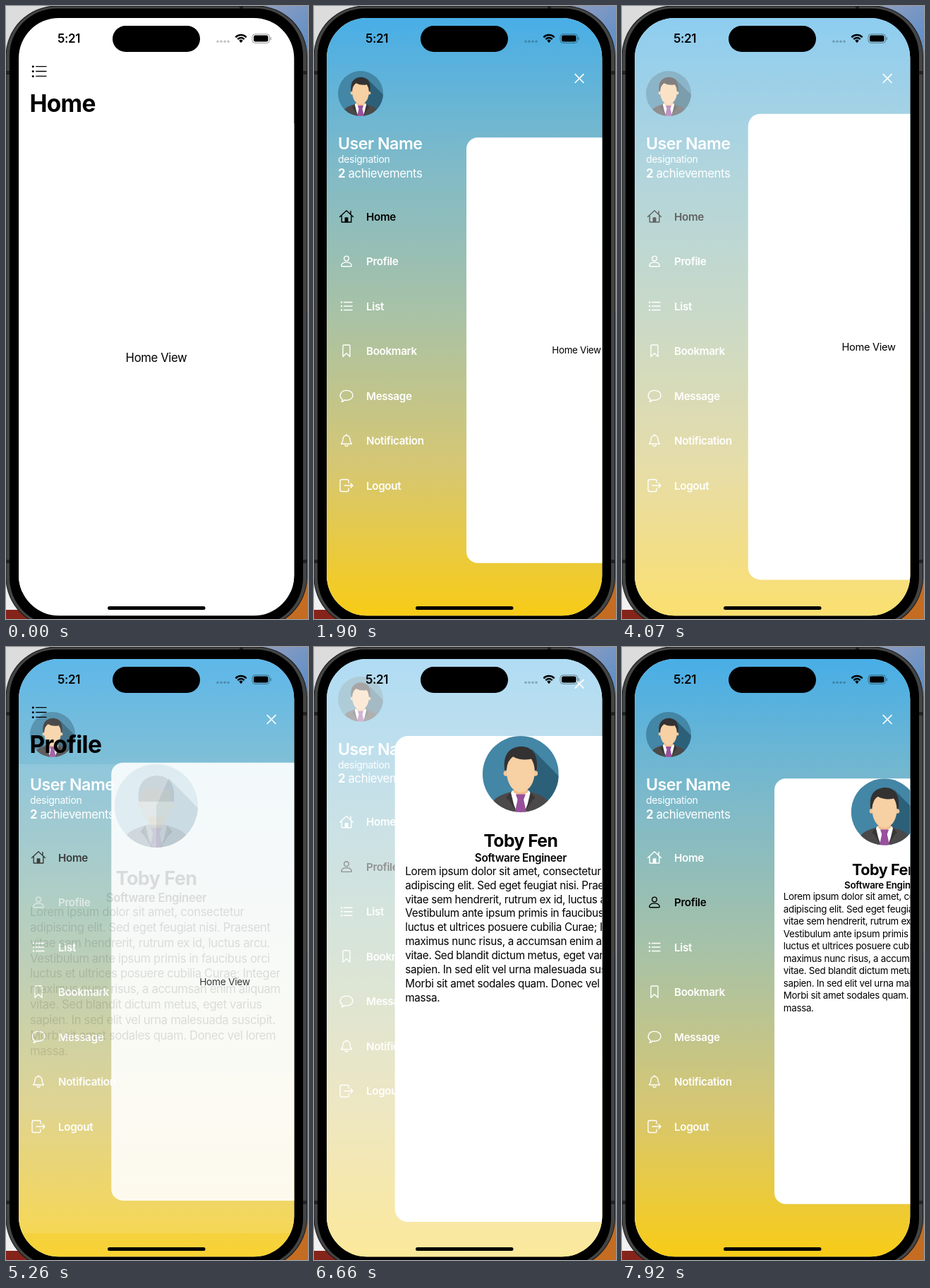
An HTML page with a canvas for the animation above (8 s loop, 428x868 px).

```html
<!DOCTYPE html>
<html lang="en">
<head>
<meta charset="utf-8">
<title>Side menu</title>
<style>
  html, body { margin: 0; width: 100%; height: 100%; overflow: hidden; background: #fff; }
  canvas { display: block; width: 428px; height: 868px; }
</style>
</head>
<body>
<canvas id="stage"></canvas>
<script>
const W = 428, H = 868, LOOP = 8000, STEP = 70;
const canvas = document.getElementById('stage');
const ctx = canvas.getContext('2d');
const dpr = window.devicePixelRatio || 1;
canvas.width = W * dpr;
canvas.height = H * dpr;

// Each move: first visible time, time already elapsed then, spring rate, opening?
const MOVES = [
  { at: 710, lag: 45, rate: 17, open: true },
  { at: 2670, lag: 20, rate: 14, open: false },
  { at: 3930, lag: 63, rate: 17, open: true },
  { at: 5190, lag: 5, rate: 18, open: false, swap: true },
  { at: 6520, lag: 19, rate: 10.6, open: true, slide: true }
];
const SWAP_AT = 5190, PRESS_AT = 5050;

// Card layout with and without the navigation bar
const FULL = { cy: 452.5, h: 753 };
const UNDER_NAV = { cy: 498, h: 664 };
const BODY = 16.7;

// Evenly spaced stops of a perceptual blend from blue to yellow
const SKY = ['#48aee6', '#80bac8', '#a9c2a5', '#d6c773', '#f8cc17'];

const ICONS = {
  Home: 'M-9.5 .5L0-8.2L9.5 .5M-6.8-1.8V8H6.8V-1.8M6-3V-7.5',
  Profile: 'M-3.4-4a3.4 3.4 0 1 0 6.8 0a3.4 3.4 0 1 0-6.8 0M-6 7.2H6Q7.4 7.2 7.2 5.6C6.5 2.8 3.5 1.4 0 1.4S-6.5 2.8-7.2 5.6Q-7.4 7.2-6 7.2Z',
  List: 'M-3.5-5.5H8M-3.5 0H8M-3.5 5.5H8',
  Bookmark: 'M-5 8V-7Q-5-8.5-3.5-8.5H3.5Q5-8.5 5-7V8L0 3.2Z',
  Message: 'M-5.5 5.2C-11 1.5-9.5-7.6 0-7.6C12-7.6 12 6.2 0 6.2Q-2 6.2-3 6Q-4.5 8.2-7 8.2Q-5.3 7-5.5 5.2Z',
  Notification: 'M-7.5 4.5Q-5 1.5-5-2A5 5.5 0 0 1 5-2Q5 1.5 7.5 4.5ZM-2.2 6.5Q0 9.5 2.2 6.5M0-7.5V-8.8',
  Logout: 'M3-4V-6.5Q3-8.5 1-8.5H-6.5Q-9-8.5-9-6V6Q-9 8.5-6.5 8.5H1Q3 8.5 3 6.5V4M-3 0H9M6-3L9 0L6 3'
};
const ITEMS = Object.keys(ICONS);
const PATHS = Object.fromEntries(ITEMS.map(k => [k, new Path2D(ICONS[k])]));

const BIO = [
  'Lorem ipsum dolor sit amet, consectetur',
  'adipiscing elit. Sed eget feugiat nisi. Praesent',
  'vitae sem hendrerit, rutrum ex id, luctus arcu.',
  'Vestibulum ante ipsum primis in faucibus orci',
  'luctus et ultrices posuere cubilia Curae; Integer',
  'maximus nunc risus, a accumsan enim aliquam',
  'vitae. Sed blandit dictum metus, eget varius',
  'sapien. In sed elit vel urna malesuada suscipit.',
  'Morbi sit amet sodales quam. Donec vel lorem',
  'massa.'
];

const clamp = x => Math.max(0, Math.min(1, x));
const smooth = x => { x = clamp(x); return x * x * (3 - 2 * x); };
const spring = u => 1 - (1 + u) * Math.exp(-u);

function box(x, y, w, h, r, fill) {
  ctx.beginPath();
  ctx.roundRect(x, y, w, h, r);
  if (fill) { ctx.fillStyle = fill; ctx.fill(); }
}

function disc(x, y, r, fill) {
  ctx.beginPath();
  ctx.arc(x, y, r, 0, Math.PI * 2);
  ctx.fillStyle = fill;
  ctx.fill();
}

function poly(fill, ...p) {
  ctx.beginPath();
  for (let i = 0; i < p.length; i += 2) ctx.lineTo(p[i], p[i + 1]);
  ctx.fillStyle = fill;
  ctx.fill();
}

// y is the middle of the capital letters
function text(str, x, y, size, weight, color = '#000', align = 'left') {
  ctx.font = `${weight} ${size}px Inter, "Liberation Sans", sans-serif`;
  ctx.letterSpacing = `${-0.022 * size}px`;
  ctx.textAlign = align;
  ctx.fillStyle = color;
  ctx.fillText(str, x, y + size * 0.364);
}

function at(x, y, scale, draw) {
  ctx.save();
  ctx.translate(x, y);
  ctx.scale(scale, scale);
  draw();
  ctx.restore();
}

function avatar(x, y, r) {
  at(x, y, r, () => {
    ctx.beginPath();
    ctx.arc(0, 0, 1, 0, Math.PI * 2);
    ctx.clip();
    ctx.fillStyle = '#4386a6';
    ctx.fillRect(-1, -1, 2, 2);
    poly('#2c6079', .3, -.66, 1, .05, 1, 1, 0, 1, 0, 0);
    // suit, shirt and tie
    ctx.beginPath();
    ctx.moveTo(-.74, 1);
    ctx.lineTo(-.72, .72);
    ctx.quadraticCurveTo(-.65, .57, -.2, .45);
    ctx.lineTo(.2, .45);
    ctx.quadraticCurveTo(.65, .57, .72, .72);
    ctx.lineTo(.74, 1);
    ctx.fillStyle = '#4b4949';
    ctx.fill();
    poly('#fff', -.22, .43, .22, .43, .32, .6, .1, 1, -.1, 1, -.32, .6);
    poly('#383636', -.26, .47, -.38, .62, -.3, .7, -.1, 1, -.18, .8);
    poly('#383636', .26, .47, .38, .62, .3, .7, .1, 1, .18, .8);
    poly('#efbd8c', -.17, .25, .17, .25, .19, .48, 0, .58, -.19, .48);
    poly('#98509d', -.13, .53, .13, .53, .08, .67, .15, 1, -.15, 1, -.08, .67);
    // head
    disc(-.38, -.02, .07, '#f3c797');
    disc(.38, -.02, .07, '#f3c797');
    ctx.beginPath();
    ctx.moveTo(-.42, -.1);
    ctx.bezierCurveTo(-.47, -.5, -.32, -.7, 0, -.73);
    ctx.bezierCurveTo(.36, -.73, .46, -.45, .42, -.1);
    ctx.fillStyle = '#333132';
    ctx.fill();
    ctx.beginPath();
    ctx.moveTo(-.37, -.12);
    ctx.quadraticCurveTo(-.35, -.36, -.2, -.46);
    ctx.quadraticCurveTo(.02, -.34, .28, -.4);
    ctx.quadraticCurveTo(.36, -.28, .37, -.1);
    ctx.bezierCurveTo(.38, .25, .2, .47, 0, .48);
    ctx.bezierCurveTo(-.2, .47, -.38, .25, -.37, -.12);
    ctx.fillStyle = '#f7d0a4';
    ctx.fill();
  });
}

function icon(name, x, y, color, scale = 1) {
  at(x, y, scale, () => {
    ctx.strokeStyle = color;
    ctx.lineWidth = 1.4 / scale;
    ctx.lineCap = ctx.lineJoin = 'round';
    ctx.stroke(PATHS[name]);
    if (name === 'List') for (const dy of [-5.5, 0, 5.5]) disc(-7, dy, 1.2, color);
    if (name === 'Home') box(-2.4, 1.2, 4.8, 7, .5, color);
  });
}

function menu(fade, shift, picked, pressed) {
  const g = ctx.createLinearGradient(0, 17, 0, 863);
  SKY.forEach((c, i) => g.addColorStop(i / (SKY.length - 1), c));
  ctx.fillStyle = g;
  ctx.fillRect(18, 17, 391, 847);

  at(0, shift, 1, () => {
    avatar(66, 124, 32);
    text('User Name', 34, 195, 23.2, 600, '#fff');
    text('designation', 34, 217, 14, 400, '#fff');
    text('2', 34, 236.5, BODY, 700, '#fff');
    text('achievements', 48.5, 236.5, BODY, 400, '#fff');
    ITEMS.forEach((name, i) => {
      const on = name === 'Home' ? 1 - picked : name === 'Profile' ? picked : 0;
      const v = Math.round(255 * (1 - on));
      const color = `rgb(${v},${v},${v})`;
      const y = 298 + 63.5 * i;
      ctx.globalAlpha = name === 'Profile' ? 1 - .4 * pressed : 1;
      icon(name, 46, y, color);
      text(name, 74, y, 15.2, 600, color);
      ctx.globalAlpha = 1;
    });
    ctx.strokeStyle = '#fff';
    ctx.lineWidth = 1.7;
    ctx.lineCap = 'round';
    ctx.beginPath();
    ctx.moveTo(370.2, 96.7); ctx.lineTo(382, 108.5);
    ctx.moveTo(382, 96.7); ctx.lineTo(370.2, 108.5);
    ctx.stroke();
  });
  ctx.fillStyle = `rgba(255,255,255,${1 - fade})`;
  ctx.fillRect(18, 17, 391, 847);
}

function card(page, layout, shrink, offset, alpha = 1) {
  ctx.globalAlpha = alpha;
  at(213 + 159 * offset, layout.cy + 35 * offset, 1 - .2 * shrink, () => {
    const top = -layout.h / 2;
    box(-195, top, 391, layout.h, 20 * clamp(8 * shrink), '#fff');
    if (page === 'Home') {
      text('Home View', 0, 0, BODY, 400, '#000', 'center');
      return;
    }
    avatar(0, top + 59, 59);
    text('Toby Fen', 0, top + 161.5, 27, 700, '#000', 'center');
    text('Software Engineer', 0, top + 188.5, BODY, 600, '#000', 'center');
    BIO.forEach((line, i) => text(line, -179, top + 209 + 21.85 * i, BODY, 400));
  });
  ctx.globalAlpha = 1;
}

function statusBar() {
  text('5:21', 89, 46.3, 17, 600, '#000', 'center');
  box(151, 28, 124, 37, 18.5, '#000');
  for (let i = 0; i < 4; i++) disc(300 + 5 * i, 50.3, 1.8, 'rgba(0,0,0,.24)');
  ctx.strokeStyle = '#000';
  ctx.lineWidth = 2.5;
  ctx.lineCap = 'butt';
  for (const r of [6.4, 10.4]) {
    ctx.beginPath();
    ctx.arc(333, 51.5, r, -Math.PI * .76, -Math.PI * .24);
    ctx.stroke();
  }
  ctx.beginPath();
  ctx.moveTo(333, 52.3);
  ctx.arc(333, 51.5, 3.7, -Math.PI * .76, -Math.PI * .24);
  ctx.fillStyle = '#000';
  ctx.fill();
  box(349, 39.8, 24.5, 12.6, 4);
  ctx.strokeStyle = 'rgba(0,0,0,.4)';
  ctx.lineWidth = 1;
  ctx.stroke();
  box(351, 41.6, 20.5, 9, 2.4, '#000');
  box(374.6, 44, 1.3, 4.2, .7, 'rgba(0,0,0,.4)');
  box(144, 850, 138.5, 5, 2.5, '#000');
}

function phone() {
  const g = ctx.createLinearGradient(380, 0, 428, 50);
  g.addColorStop(0, '#8b9cc0');
  g.addColorStop(1, '#5f8fc8');
  ctx.fillStyle = '#dcdcdc';
  ctx.fillRect(0, 0, 214, 434);
  ctx.fillStyle = g;
  ctx.fillRect(214, 0, 214, 434);
  ctx.fillStyle = '#f0f0f0';
  ctx.fillRect(0, 434, 214, 421);
  ctx.fillStyle = '#85241a';
  ctx.fillRect(0, 855, 214, 13);
  ctx.fillStyle = '#c46d22';
  ctx.fillRect(214, 434, 214, 434);

  box(-.5, -.5, 427.5, 881, 72, '#1c1c1c');
  box(.5, .7, 425.5, 878.6, 71, '#434444');
  ctx.fillStyle = '#222';
  for (const y of [92, 784]) {
    ctx.fillRect(0, y, 5, 5);
    ctx.fillRect(421, y, 5, 5);
  }
  ctx.fillRect(331, 0, 5, 4);
  box(5, 3.5, 416, 873, 67, '#000');
}

function stateAt(t) {
  const s = { fade: 0, offset: 0, shift: 0, open: false, swap: 1, swapping: false };
  const move = MOVES.filter(m => t >= m.at).pop();
  if (!move) return s;
  const ms = move.lag + Math.floor((t - move.at) / STEP) * STEP;
  const f = smooth(ms / 350), o = spring(move.rate * ms / 1000);
  s.open = move.open;
  s.fade = move.open ? f : 1 - f;
  s.offset = move.open ? o : 1 - o;
  if (move.slide) s.shift = -101 * (1 - o);
  if (move.swap) { s.swap = f; s.swapping = f < 1; }
  return s;
}

function draw(t) {
  const s = stateAt(t);
  const page = t < SWAP_AT ? 'Home' : 'Profile';
  const picked = page === 'Home' ? 0 : s.swap ** 2;
  const pressed = smooth((t - PRESS_AT) / 70) * (1 - smooth((t - PRESS_AT - 210) / 200));

  ctx.setTransform(dpr, 0, 0, dpr, 0, 0);
  phone();
  ctx.save();
  box(18, 17, 390.3, 846.3, 57, '#fff');
  ctx.clip();
  if (s.fade > 0) menu(s.fade, s.shift, picked, pressed);
  if (s.swapping) {
    card('Home', FULL, s.fade, s.offset, 1 - s.swap);
    card('Profile', UNDER_NAV, 0, 0, s.swap);
  } else {
    card(page, s.open ? FULL : UNDER_NAV, s.fade, s.offset);
  }
  if (!s.open) {
    icon('List', 47, 92.5, '#000', 1.25);
    text(page, 33.5, 138, 33.5, 700);
  }
  ctx.restore();
  statusBar();
}

const start = performance.now();
function tick() {
  draw((performance.now() - start) % LOOP);
  requestAnimationFrame(tick);
}
tick();
</script>
</body>
</html>
```
